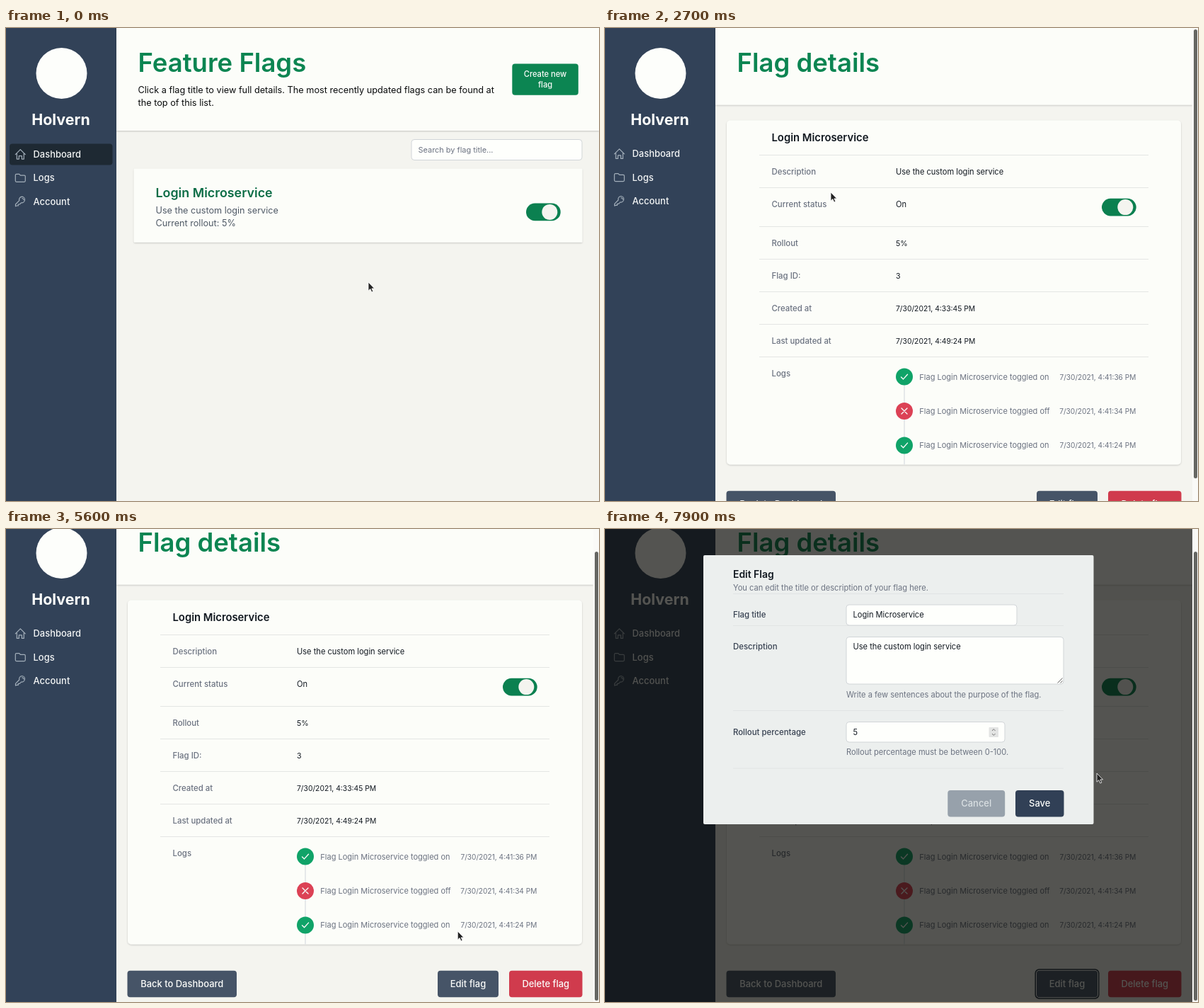
These frames come from a looping animation (838x668 px, 8000 ms). An HTML page:

```html
<!DOCTYPE html>
<html lang="en">
<head>
<meta charset="utf-8">
<title>Feature flags</title>
<style>
  html, body { margin: 0; width: 100%; height: 100%; overflow: hidden; background: #f4f4ef; }
  svg { display: block; width: 100vw; height: 100vh; }
  text { font-family: Inter, "Open Sans", sans-serif; font-optical-sizing: none; white-space: pre; }
  .status { font-family: "Noto Sans", "Open Sans", sans-serif; }
</style>
</head>
<body>
<svg id="stage" viewBox="0 0 838 668" xmlns="http://www.w3.org/2000/svg"></svg>
<script>
const LOOP = 8000;
const PAPER = '#fcfdf9', SLATE = '#465467', GRAY = '#6b7280', INK = '#111820', GREEN = '#0c8552';
const BODY = 11.1, LABEL = 11.4, NAV = 12.95; // font sizes

const rect = (x, y, x2, y2, fill, r = 0, extra = '') =>
  `<rect x="${x}" y="${y}" width="${x2 - x}" height="${y2 - y}" rx="${r}" fill="${fill}" ${extra}/>`;
const text = (str, x, y, size, fill, weight = 400, anchor = 'start') =>
  `<text x="${x}" y="${y}" font-size="${size}" fill="${fill}" font-weight="${weight}" text-anchor="${anchor}">${str}</text>`;
const line = (d, stroke, width = 1, extra = '') =>
  `<path d="${d}" fill="none" stroke="${stroke}" stroke-width="${width}" ${extra}/>`;
const group = (id, body, extra = '') => `<g id="${id}" ${extra}>${body}</g>`;
const round = 'stroke-linecap="round" stroke-linejoin="round"';
const shadow = 'filter="url(#shadow)"';

const button = (label, x, y, x2, y2, fill, color = '#fbfcfa', id = '') =>
  rect(x, y, x2, y2, fill, 4, id && `id="${id}"`) +
  text(label, (x + x2) / 2, (y + y2) / 2 + 4.5, NAV, color, 500, 'middle');

const toggle = (x, y) =>
  rect(x, y, x + 48.7, y + 24.6, '#0b8050', 12.3) +
  `<circle cx="${x + 33.3}" cy="${y + 12.3}" r="11" fill="#f4f4ef"/>`;

const field = (x, y, x2, y2) =>
  rect(x + .5, y + .5, x2 - .5, y2 - .5, '#fefffc', 4, 'stroke="#d1d5d8"');

// Sidebar
const icons = [
  'M-7 0L0 -7 7 0M-5 -1.5V6.5H-2V2H2V6.5H5V-1.5',
  'M-7 -4Q-7 -5.5 -5.5 -5.5H-1.5L0 -3.7H5.5Q7 -3.7 7 -2.2V4Q7 5.5 5.5 5.5H-5.5Q-7 5.5 -7 4Z',
  'M2.5 -6.8A4.3 4.3 0 1 1 1.2 1.8L-1 4H-3V6H-5L-6.8 6.8V4L-1.5 -1.3A4.3 4.3 0 0 1 2.5 -6.8M2.5 -4.5A2 2 0 0 1 4.6 -2.4'
];
const sidebar = active =>
  '<circle cx="78.5" cy="64" r="36" fill="#fdfefb"/>' +
  text('Holvern', 77.5, 137, 21.4, '#fdfefb', 700, 'middle') +
  (active ? rect(5, 163.5, 150.5, 193.5, '#1e2933', 4) : '') +
  ['Dashboard', 'Logs', 'Account'].map((label, i) => {
    const y = 178.6 + i * 33.2 - (active ? 0 : .7);
    return `<g transform="translate(20.3 ${y})">${line(icons[i], '#a3afba', 1.2, round)}</g>` +
      text(label, 38.5, y + 4.5, NAV, '#f3f5f5', 500);
  }).join('');

const header = (title, x2, height) =>
  rect(156, -40, x2, height, PAPER, 0, shadow) + text(title, 186.5, 62, 36.5, GREEN, 600);

const dashboard =
  header('Feature Flags', 838, 145) +
  text('Click a flag title to view full details. The most recently updated flags can be found at', 186.5, 92.4, 12.72, '#0a0c0d') +
  text('the top of this list.', 186.5, 110.4, 12.72, '#0a0c0d') +
  rect(715.3, 50.5, 808.8, 94.8, GREEN, 4) +
  text('Create new', 762, 69, BODY, '#fbfcfa', 500, 'middle') +
  text('flag', 762, 84, BODY, '#fbfcfa', 500, 'middle') +
  field(572.5, 157, 814.5, 187) +
  text('Search by flag title...', 582.5, 176.2, 10.95, GRAY) +
  rect(180.8, 198.8, 814.3, 302.8, PAPER, 1, shadow) +
  text('Login Microservice', 211.5, 239, 17.85, '#0c6d46', 600) +
  text('Use the custom login service', 211.5, 261.8, 12.65, '#4f5966') +
  text('Current rollout: 5%', 211.5, 279.8, 12.65, '#4f5966') +
  toggle(735, 247.6) + sidebar(true);

// Flag details
const rows = [
  ['Description', 202.5, 'Use the custom login service', BODY],
  ['Current status', 248.5, 'On', BODY],
  ['Rollout', 303.5, '5%', 10.6],
  ['Flag ID:', 350, '3', 10.6],
  ['Created at', 396, '7/30/2021, 4:33:45 PM', 10.3],
  ['Last updated at', 442, '7/30/2021, 4:49:24 PM', 10.3],
  ['Logs', 488.3, '', BODY]
];
const logEntry = (state, time, i) => {
  const y = 492.6 + i * 48.4, on = state === 'on';
  return `<circle cx="423" cy="${y}" r="12" fill="${on ? '#10a368' : '#dc4155'}"/>` +
    `<g transform="translate(423 ${y})">` +
    line(on ? 'M-4.5 .3L-1.5 3.3 4.5 -3.3' : 'M-4 -4L4 4M4 -4L-4 4', '#f8faf8', 1.4, round) + '</g>' +
    text(`Flag Login Microservice toggled ${state}`, 444.3, y + 4, 11, GRAY) +
    text(`7/30/2021, ${time} PM`, 750.3, y + 4, 10.1, GRAY, 400, 'end');
};
const details =
  header('Flag details', 830, 108.5) +
  rect(172, 130.5, 814, 616.5, PAPER, 5, shadow) +
  text('Login Microservice', 235.5, 160, 14.8, INK, 600) +
  [179.5, 225.5, 280.5, 326.5, 372.5, 418.5, 464.5].map(y => line(`M218 ${y}H768`, '#e4e6e4')).join('') +
  rows.map(([label, y, value, size]) =>
    text(label, 235.5, y + 4, LABEL, GRAY, 500) + text(value, 411, y + 4, size, INK)).join('') +
  toggle(702, 240.8) +
  line('M423 500V616.5', '#dfe2e4', 1.5) +
  [['on', '4:41:36'], ['off', '4:41:34'], ['on', '4:41:24']].map(([s, t], i) => logEntry(s, t, i)).join('') +
  button('Back to Dashboard', 171.5, 653.8, 326, 691.3, SLATE) +
  group('ring', rect(607.5, 651.3, 698.5, 693.8, '#1f2c3d', 6) + rect(609, 652.8, 697, 692.3, '#fcfdfb', 5)) +
  button('Edit flag', 610, 653.8, 696, 691.3, SLATE, '#fbfcfa', 'edit') +
  button('Delete flag', 711, 653.8, 814.5, 691.3, '#d03b4d') +
  sidebar(false);

// Edit dialog
const modal =
  rect(0, 0, 830, 668, '#0a0a07', 0, 'opacity=".69"') +
  rect(139, 37, 690.5, 417, '#ecefee', 2) +
  text('Edit Flag', 181, 69, 13.9, INK, 600) +
  text('You can edit the title or description of your flag here.', 181, 87.2, BODY, GRAY) +
  [91.5, 136.5, 256.5, 338].map(y => line(`M181 ${y}H648`, '#e1e4e4')).join('') +
  [['Flag title', 125], ['Description', 170.3], ['Rollout percentage', 290.5]]
    .map(([label, y]) => text(label, 181, y, LABEL, '#374151', 500)).join('') +
  field(340.5, 106.5, 582.5, 136.5) + text('Login Microservice', 350.5, 125.4, BODY, INK) +
  field(340.5, 152, 648.5, 219.5) + text('Use the custom login service', 350.5, 170.2, BODY, INK) +
  line('M639.5 217.5L646.5 210.5M643.5 217.5L646.5 214.5', '#666', 1) +
  text('Write a few sentences about the purpose of the flag.', 341, 237.5, BODY, GRAY) +
  field(340.5, 272, 565.5, 301.5) + text('5', 350.5, 290.8, BODY, INK) +
  rect(542.5, 280, 556, 294, '#e3e4e3', 1) +
  line('M547 285L549.3 282.6 551.6 285M547 289L549.3 291.4 551.6 289', '#777', 1) +
  text('Rollout percentage must be between 0-100.', 341, 319, BODY, GRAY) +
  button('Cancel', 484.3, 369, 565.2, 406.5, '#97a1ab', '#d9dfe2') +
  button('Save', 580, 369, 648.5, 406.5, '#314056');

const statusBar =
  rect(-4, 652.5, 118.5, 672, '#303030', 3, 'stroke="#555"') +
  '<text class="status" x="2" y="664.5" font-size="11" fill="#f2f2f2">localhost:3000/flags/3</text>';

const arrow = '<path d="M0 0V12.2L2.8 9.6 4.8 14 6.8 13.1 4.9 8.9H8.6Z" fill="#222" stroke="#fff" stroke-width=".8"/>';
const hand = '<path d="M-1 1Q0 -.6 1 1V4.5Q3 3.6 3.6 5 5.4 4.2 6 5.6 8 5 8 7V9.5Q8 11 6.8 13H-.2Q-1 11 -3.6 8.2 -4 6.6 -2.4 6.8L-1 8Z" fill="#fff" stroke="#222" stroke-width="1" stroke-linejoin="round"/>';

const stage = document.getElementById('stage');
stage.innerHTML =
  `<defs><filter id="shadow" x="-5%" y="-10%" width="110%" height="120%">
    <feDropShadow dx="0" dy="1" stdDeviation="1.2" flood-color="#000" flood-opacity=".2"/></filter></defs>` +
  rect(0, 0, 838, 668, '#f4f4ef') +
  rect(0, 0, 156, 668, '#324258') +
  group('dashboard', dashboard) +
  group('details', details) +
  group('modal', modal) +
  group('scrollbar', rect(830, 0, 838, 668, '#fafaf7') + rect(832, 2, 837, 636, '#656662', 2.5, 'id="thumb"')) +
  group('status', statusBar) +
  group('cursor', group('arrow', arrow) + group('hand', hand));

const el = {};
for (const node of stage.querySelectorAll('[id]')) el[node.id] = node;

// Pointer stops: time, x, y
const path = [
  [500, 512, 359], [900, 462, 322], [1000, 462, 322], [1600, 321, 232],
  [2400, 321, 232], [2500, 319, 232],
  [2900, 319, 232], [3100, 372, 240], [3200, 372, 240], [3400, 430, 248],
  [3500, 430, 248], [3900, 566, 267],
  [4800, 566, 267], [5400, 632, 545], [5500, 632, 545], [5900, 657, 637],
  [7300, 657, 637], [7600, 686, 405], [7700, 686, 405], [7900, 695, 345]
];

function pointerAt(t) {
  const i = path.findIndex(p => p[0] > t);
  if (i === 0) return path[0].slice(1);
  if (i < 0) return path[path.length - 1].slice(1);
  const [t0, x0, y0] = path[i - 1], [t1, x1, y1] = path[i];
  const k = (t - t0) / (t1 - t0);
  return [x0 + (x1 - x0) * k, y0 + (y1 - y0) * k];
}

const show = (node, on) => node.setAttribute('display', on ? 'inline' : 'none');
const move = (node, x, y) => node.setAttribute('transform', `translate(${x} ${y})`);

function render(ms) {
  const t = Math.floor(ms / 100) * 100;
  const [x, y] = pointerAt(t);
  const onDetails = t >= 2500, open = t >= 6700;
  const scroll = t < 4100 ? 0 : t < 4200 ? 12 : 30;
  const overLink = !onDetails && y < 242 && x < 376;

  show(el.dashboard, !onDetails);
  show(el.details, onDetails);
  show(el.scrollbar, onDetails);
  show(el.modal, open);
  show(el.ring, t >= 6500);
  show(el.status, !onDetails && t >= 1600);
  show(el.arrow, !overLink);
  show(el.hand, overLink);
  move(el.details, 0, -scroll);
  move(el.thumb, 0, scroll);
  move(el.cursor, x, y);
  el.edit.setAttribute('fill', !open && y > 624 ? '#6c7785' : SLATE);
}

const start = performance.now();
function tick() {
  render((performance.now() - start) % LOOP);
  requestAnimationFrame(tick);
}
tick();
</script>
</body>
</html>
```
